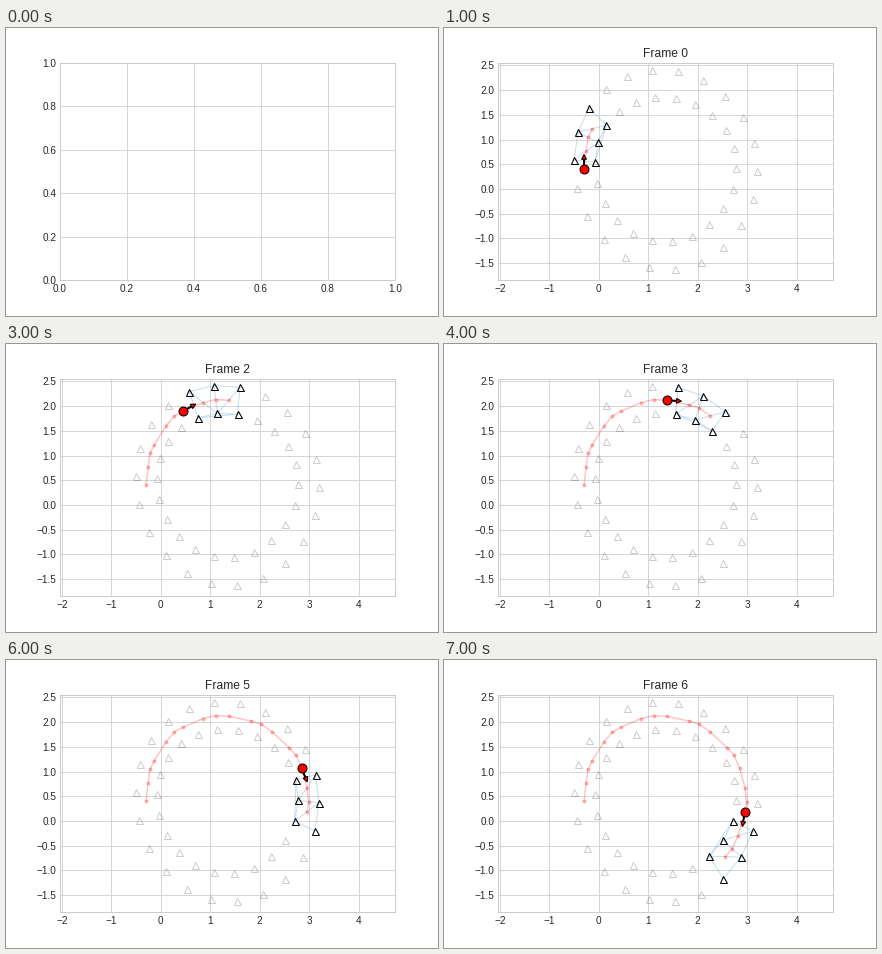
These frames come from a looping animation (432x288 px, 8 s). A matplotlib script:

```python
import numpy as np
import matplotlib.pyplot as plt
from matplotlib.animation import FuncAnimation
from matplotlib.tri import Triangulation

plt.style.use("seaborn-v0_8-whitegrid")
plt.rcParams["font.family"] = "Liberation Sans"
plt.rcParams["font.size"] = 10

GATES = 22
STEPS = 7
START = np.array([[-.3, .4]])

u = 2 * np.pi * (np.arange(GATES) - .88) / GATES


def ring(rx, ry, tilt):
    """Points on a slightly tilted ellipse, clockwise from its left end."""
    return np.column_stack([-rx * np.cos(u - tilt), ry * np.sin(u + tilt)])


# An oval track: the cones stand on both sides of its centre line.
centre = (1.33, .44) + ring(1.64, 1.74, .015)
centre += np.outer(np.cos(2 * u), (.02, .04))
offset = ring(.21, .28, .055)
LEFT = centre + offset
RIGHT = centre - offset


def plan(step):
    """Triangulate the visible cones; return the mesh and its centre line."""
    seen = slice(2 * step + 1, 2 * step + 4)
    pts = np.vstack([LEFT[seen], RIGHT[seen]])
    mesh = Triangulation(pts[:, 0], pts[:, 1])
    gates = set()
    for tri, near in zip(mesh.triangles, mesh.neighbors):
        for e in range(3):
            a, b = sorted((int(tri[e]), int(tri[(e + 1) % 3])))
            if near[e] >= 0 and a < 3 <= b:
                gates.add((a, b))
    mids = [(pts[a] + pts[b]) / 2 for a, b in sorted(gates, key=sum)]
    return mesh, np.array(mids)


plans = [plan(s) for s in range(STEPS)]

fig, ax = plt.subplots(figsize=(6, 4), dpi=72)
fig.subplots_adjust(left=.125, right=.9, bottom=.125, top=.88)


def cones(x, y, alpha):
    ax.plot(x, y, "^", ms=7, mfc="none", mec="black", mew=1, alpha=alpha)


def draw(i):
    ax.clear()
    if i == 0:
        return
    step = i - 1
    mesh, mids = plans[step]
    past = np.vstack([START] + [m for _, m in plans[:step]])
    route = np.vstack([past, mids])
    car = past[-1]
    aim = car - past[-2] if step else np.array([0, 1])
    aim = .2 * aim / np.hypot(*aim)

    cones(*np.vstack([LEFT, RIGHT]).T, .2)
    ax.triplot(mesh, color="tab:blue", lw=1, alpha=.25)
    cones(mesh.x, mesh.y, 1)
    ax.plot(*route.T, ".-", color="red", lw=1.5, ms=6, alpha=.23)
    ax.arrow(*car, *aim, width=.02, head_width=.1, head_length=.1,
             fc="red", ec="black", lw=1, zorder=3)
    ax.plot(*car, "o", ms=9, mfc="red", mec="black", mew=1, zorder=4)

    ax.set_xlim(-2.04, 4.732)
    ax.set_ylim(-1.84, 2.558)
    ax.set_xticks(range(-2, 5))
    ax.set_yticks(np.arange(-3, 6) / 2)
    ax.set_title(f"Frame {step}")


anim = FuncAnimation(fig, draw, frames=STEPS + 1, interval=1000, repeat=True)
plt.show()
```
